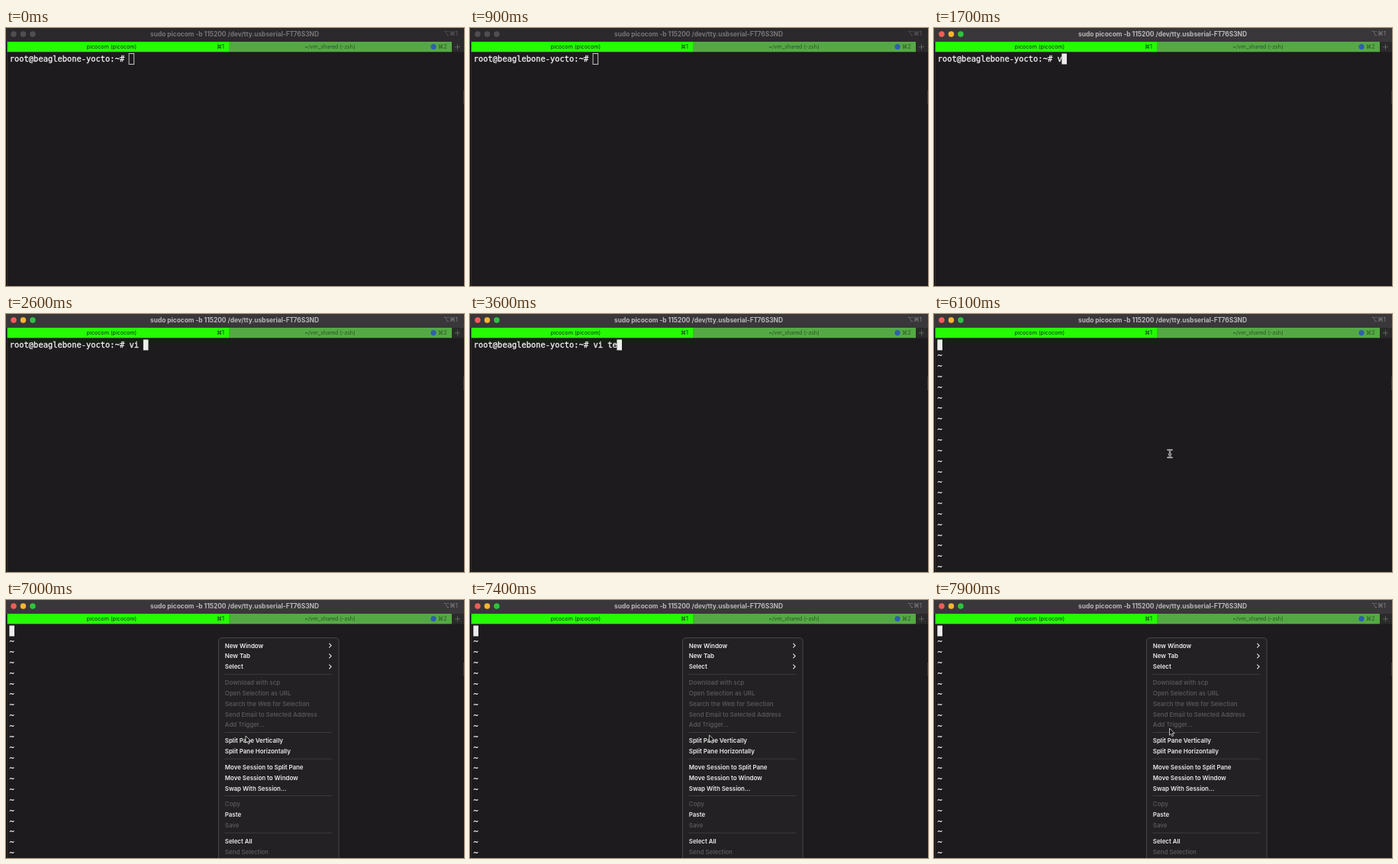
Recreate the animation shown at these times as an HTML page. Size 600x338 px, loop 8 s.

```html
<!DOCTYPE html>
<html lang="en">
<head>
<meta charset="utf-8">
<title>Terminal session</title>
<style>
html, body { margin: 0; width: 100%; height: 100%; overflow: hidden; background: #1d1b1d; }
svg { display: block; width: 600px; height: 338px; }
text { white-space: pre; font-family: Inter, "DejaVu Sans", sans-serif; }
.mono { font: 10.41px "DejaVu Sans Mono", monospace; fill: #f2f2f2; stroke: #f2f2f2; stroke-width: .3px; }
.title { font-size: 8.36px; font-weight: 700; }
.tab { font-size: 7.15px; }
.keys { font-size: 7.8px; }
.item { font-size: 7.9px; font-weight: 600; fill: #ececec; }
.off { font-size: 7.98px; font-weight: 500; fill: #5d5c5e; }
</style>
</head>
<body>
<svg id="stage" viewBox="0 0 600 338"></svg>
<script>
const LOOP = 8000, CHAR = 6.267, ROW = 13.85, LEFT = 4.8;
const PROMPT = "root@beaglebone-yocto:~# ";
const FOCUS = 1300, EDITOR = 5100, BEAM = 5700, MENU = 6500;

const typed = [
  [0, ""], [1600, "v"], [1800, "vi"], [2100, "vi "], [3200, "vi t"], [3500, "vi te"],
  [3800, "vi tes"], [4000, "vi test"], [4300, "vi test_canmatrix.py "]
];

const pointerPath = [
  [BEAM, 309, 183], [6150, 309, 183], [6450, 278, 181], [6600, 278, 181],
  [6950, 314, 178], [7300, 314, 178], [7800, 308.5, 168], [LOOP, 308.5, 168]
];

// "-" is a rule, "!" marks a disabled item, ">" a submenu
const menuItems = [
  "New Window>", "New Tab>", "Select>", "-",
  "!Download with scp", "!Open Selection as URL", "!Search the Web for Selection",
  "!Send Email to Selected Address", "!Add Trigger...", "-",
  "Split Pane Vertically", "Split Pane Horizontally", "-",
  "Move Session to Split Pane", "Move Session to Window", "Swap With Session...", "-",
  "!Copy", "Paste", "!Save", "-", "Select All", "!Send Selection"
];

const stage = document.getElementById("stage");

function add(parent, tag, attrs, content) {
  const el = document.createElementNS("http://www.w3.org/2000/svg", tag);
  for (const key in attrs) el.setAttribute(key, attrs[key]);
  if (content !== undefined) el.textContent = content;
  parent.appendChild(el);
  return el;
}
const rect = (parent, x, y, width, height, fill, more) =>
  add(parent, "rect", { x, y, width, height, fill, ...more });
const label = (parent, x, y, cls, content, more) =>
  add(parent, "text", { x, y, class: cls, ...more }, content);
const show = (el, on) => el.setAttribute("visibility", on ? "visible" : "hidden");

// Window frame
rect(stage, 0, 0, 600, 338, "#1d1b1d");
const bar = rect(stage, 0, 0, 600, 18, "#393739");
const lights = [10, 22.5, 35].map(cx => add(stage, "circle", { cx, cy: 8.1, r: 3.75 }));
const mid = { "text-anchor": "middle" };
const end = { "text-anchor": "end" };
const title = label(stage, 299.5, 11, "title",
  "sudo picocom -b 115200 /dev/tty.usbserial-FT76S3ND", mid);
const shortcut = label(stage, 592, 10.4, "keys", "⌥⌘1", end);

// Tabs
rect(stage, 0, 18, 600, 13.5, "#2b2a2b");
rect(stage, 1.5, 18, 290.5, 13.3, "#26fb05");
rect(stage, 292, 18, 292, 13.3, "#55a945");
label(stage, 138.5, 27.4, "tab", "picocom (picocom)", { ...mid, fill: "#083003" });
label(stage, 286, 27.4, "tab", "⌘1", { ...end, fill: "#083003" });
label(stage, 424.5, 27.4, "tab", "~/vm_shared (-zsh)", { ...mid, fill: "#2a5423" });
add(stage, "circle", { cx: 560, cy: 24.6, r: 3.6, fill: "#2d5fb0" });
label(stage, 577.5, 27.4, "tab", "⌘2", { ...end, fill: "#2a5423" });
add(stage, "path", { d: "M588 24.8h7M591.5 21.3v7", stroke: "#777677", "stroke-width": .7 });
rect(stage, 0, 18, 1.2, 320, "#0d0e12");
rect(stage, 1.2, 31.5, .6, 306.5, "#3d3c3e");
rect(stage, 599, 82, 1, 18, "#3c3b3d");

// Terminal contents
const command = label(stage, LEFT, 44.1, "mono", "");
const tildes = add(stage, "g", {});
for (let i = 1; i <= 21; i++) label(tildes, LEFT - .3, 44.3 + i * ROW, "mono", "~");
const cursor = rect(stage, 0, 33.5, 6.6, 14, "#ededed");

// Context menu
const menu = add(stage, "g", {});
rect(menu, 278.5, 49.5, 157.5, 310, "#232123", { rx: 4.5, stroke: "#525153", "stroke-width": .8 });
let y = 59.5;
for (const item of menuItems) {
  if (item === "-") {
    rect(menu, 286.5, y - 4.2, 141, .8, "#434244");
    y += 6.95;
    continue;
  }
  label(menu, 286.8, y + 3, item[0] === "!" ? "item off" : "item", item.replace(/[!>]/g, ""));
  if (item.endsWith(">")) {
    add(menu, "path", {
      d: `M423.6 ${y - 2.4}l2.5 2.5-2.5 2.5`, fill: "none", stroke: "#e6e6e6",
      "stroke-width": 1.1, "stroke-linecap": "round", "stroke-linejoin": "round"
    });
  }
  y += ROW;
}

// Pointers
const beam = add(stage, "g", { fill: "none", "stroke-linecap": "round" });
const beamShape = "M-2.6-5Q-.3-5 0-3.6Q.3-5 2.6-5M0-3.6V3.6M-2.6 5Q-.3 5 0 3.6Q.3 5 2.6 5M-1.3 .8H1.3";
add(beam, "path", { d: beamShape, stroke: "#e4e4e4", "stroke-width": 2.2 });
add(beam, "path", { d: beamShape, stroke: "#1a1a1a", "stroke-width": .7 });
const arrow = add(stage, "path", {
  d: "M0 0V9.2L2.1 7.3L3.6 10.6L5.1 9.9L3.7 6.7H6.6Z",
  fill: "#101010", stroke: "#e8e8e8", "stroke-width": .8, "stroke-linejoin": "round"
});

function pointAt(t) {
  const i = Math.max(1, pointerPath.findIndex(p => p[0] > t));
  const [t0, x0, y0] = pointerPath[i - 1], [t1, x1, y1] = pointerPath[i];
  const k = Math.min(1, Math.max(0, (t - t0) / (t1 - t0)));
  const ease = k * k * (3 - 2 * k);
  return [x0 + (x1 - x0) * ease, y0 + (y1 - y0) * ease];
}

function draw(t) {
  const focused = t >= FOCUS, editing = t >= EDITOR, menuOpen = t >= MENU;

  bar.setAttribute("fill", focused ? "#393739" : "#2b292b");
  title.setAttribute("fill", focused ? "#b9b8b9" : "#767576");
  shortcut.setAttribute("fill", focused ? "#858485" : "#626162");
  const colours = focused ? ["#f65c54", "#f6b62e", "#2bc440"] : Array(3).fill("#504f50");
  lights.forEach((light, i) => light.setAttribute("fill", colours[i]));

  const line = editing ? "" : PROMPT + typed.filter(step => step[0] <= t).pop()[1];
  if (command.textContent !== line) command.textContent = line;
  show(tildes, editing);

  cursor.setAttribute("x", LEFT + line.length * CHAR - .4);
  cursor.setAttribute("fill", focused ? "#ededed" : "none");
  cursor.setAttribute("stroke", focused ? "none" : "#d8d8d8");
  cursor.setAttribute("stroke-width", .9);

  show(menu, menuOpen);
  show(beam, t >= BEAM && !menuOpen);
  show(arrow, menuOpen);
  const at = `translate(${pointAt(t)})`;
  beam.setAttribute("transform", at);
  arrow.setAttribute("transform", at);
}

const start = performance.now();
function tick() {
  draw((performance.now() - start) % LOOP);
  requestAnimationFrame(tick);
}
tick();
</script>
</body>
</html>
```
